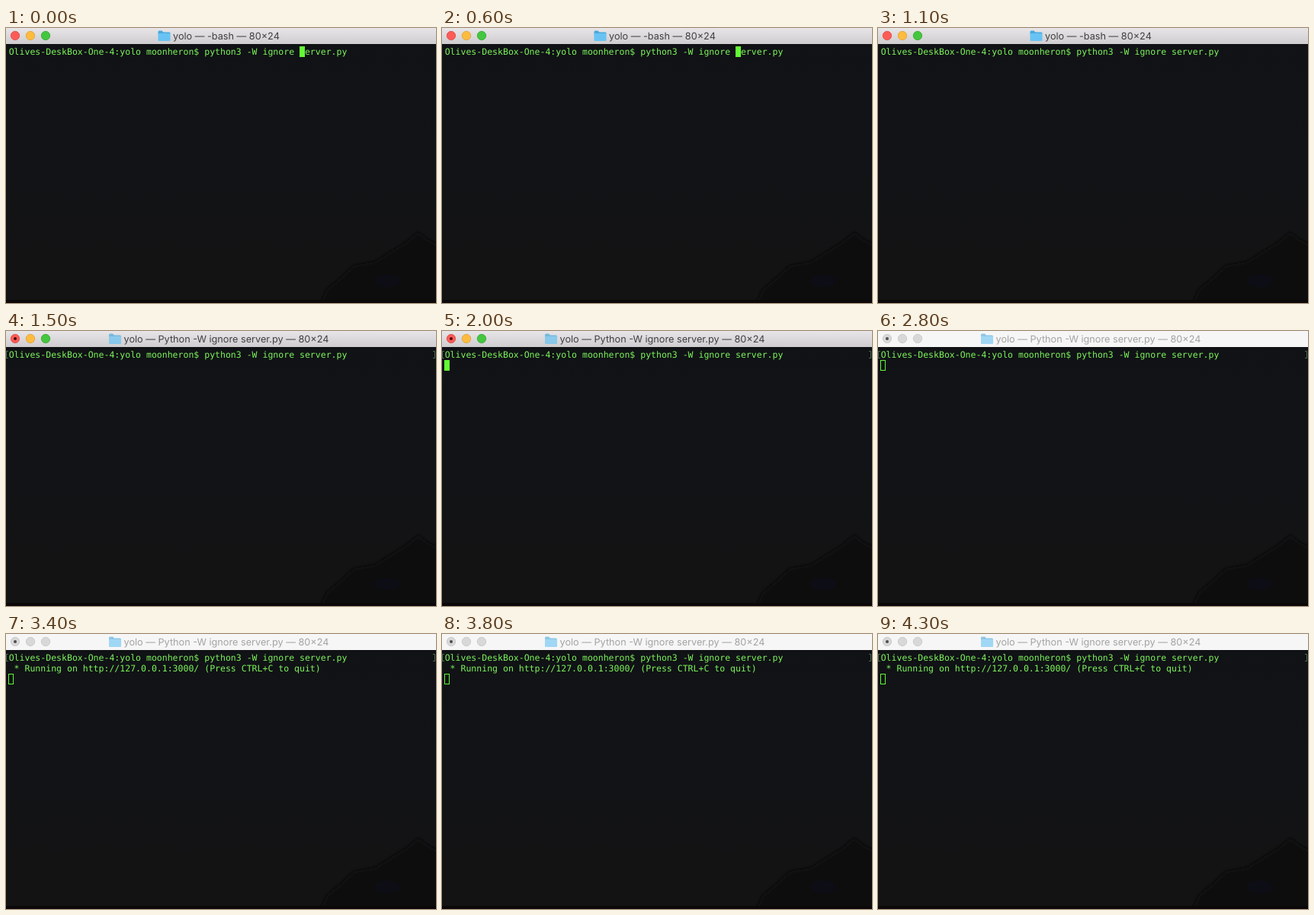
These frames come from a looping animation (564 px wide and 360 px high, 5 s). An HTML page:

```html
<!DOCTYPE html>
<html lang="en">
<head>
<meta charset="utf-8">
<style>
  html, body { margin: 0; width: 100%; height: 100%; overflow: hidden; background: #111316; }
  svg { display: block; width: 564px; height: 360px; }
  text { white-space: pre; text-rendering: geometricPrecision; }
  .term { font: 11.53px "DejaVu Sans Mono", monospace; fill: #7df45c; }
  #title { font: 12.7px Inter, sans-serif; fill: #403f41; }
  #lights circle { stroke-width: .8; }
  .blur #title { fill: #a3a3a3; }
  .blur #lights circle { fill: #d8d8d8; stroke: #c6c6c6; }
  .blur #bar { fill: #f6f6f6; }
  .blur #edited { fill: #4c4c4c; }
</style>
</head>
<body>
<svg id="stage" viewBox="0 0 564 360">
  <defs>
    <linearGradient id="sky" x2="0" y2="1">
      <stop stop-color="#101215"/>
      <stop offset=".5" stop-color="#111316"/>
      <stop offset=".8" stop-color="#131314"/>
      <stop offset="1" stop-color="#141313"/>
    </linearGradient>
    <linearGradient id="chrome" x2="0" y2="1">
      <stop stop-color="#e7e5e7"/>
      <stop offset="1" stop-color="#cfcdcf"/>
    </linearGradient>
    <filter id="soft"><feGaussianBlur stdDeviation="2"/></filter>
  </defs>

  <rect width="564" height="360" fill="url(#sky)"/>
  <g filter="url(#soft)">
    <path d="M412 362L420 343 440 326 456 311 484 306 506 292 524 281 541 267 552 276 570 285V362Z" fill="#09090b"/>
    <ellipse cx="500" cy="331" rx="17" ry="9" fill="#111113"/>
  </g>
  <rect y="356" width="564" height="4" fill="#0c0809"/>

  <rect id="bar" width="564" height="21" fill="url(#chrome)"/>
  <rect y="21" width="564" height="1" fill="#0b0c0d"/>
  <g id="lights">
    <circle cx="12" cy="10" r="5.7" fill="#fc5b57" stroke="#df4744"/>
    <circle cx="32" cy="10" r="5.7" fill="#fdbc40" stroke="#de9f34"/>
    <circle cx="52" cy="10" r="5.7" fill="#45c63f" stroke="#2fa82d"/>
  </g>
  <circle id="edited" cx="12" cy="10" r="2" fill="#4e0807"/>
  <g id="folder">
    <path d="M0 5V1.5Q0 0 1.5 0H5L7 2H14.5Q16 2 16 3.5V5Z" fill="#4aa9dd"/>
    <rect y="3.5" width="16" height="10" rx="1" fill="#68c3f3"/>
  </g>
  <text id="title" y="15"></text>

  <text class="term" x="3.7" y="35">Olives-DeskBox-One-4:yolo moonheron$ python3 -W ignore server.py</text>
  <g id="marks" fill="none" stroke="#4c6b4c">
    <path d="M3 26.5H.5V35.5H3M560 26.5H562.5V35.5H560"/>
  </g>
  <text id="output" class="term" x="3.7" y="48.6"> * Running on http://127.0.0.1:3000/ (Press CTRL+C to quit)</text>
  <rect id="cursor" stroke="#63f83a"/>
</svg>

<script>
const LOOP = 5000, BLINK = 800;
const ENTER = 1500, UNFOCUS = 2800, READY = 3300;
const el = id => document.getElementById(id);
const show = (id, on) => el(id).style.display = on ? "" : "none";

function setAttributes(id, values) {
  for (const name in values) el(id).setAttribute(name, values[name]);
}

function draw(time) {
  const running = time >= ENTER;
  const focused = time < UNFOCUS;
  const ready = time >= READY;

  el("stage").classList.toggle("blur", !focused);
  el("title").textContent = running ? "yolo — Python -W ignore server.py — 80×24" : "yolo — -bash — 80×24";
  setAttributes("title", { x: running ? 154.5 : 219 });
  setAttributes("folder", {
    transform: `translate(${running ? 135 : 199.5} 3.5)`,
    opacity: focused ? (running ? .7 : 1) : .6
  });
  show("edited", running);
  show("marks", running);
  show("output", ready);

  // A window without focus keeps a steady hollow cursor.
  const inset = focused ? 0 : .5;
  const x = running ? 3 : 385;
  const y = ready ? 52 : running ? 38 : 24;
  setAttributes("cursor", {
    x: x + inset, y: y + inset,
    width: 7 - 2 * inset, height: 14 - 2 * inset,
    fill: focused ? "#63fb34" : "none",
    "stroke-width": focused ? 0 : 1
  });
  show("cursor", !focused || Math.floor(time / BLINK) % 2 === 0);
}

function tick() {
  draw(performance.now() % LOOP);
  requestAnimationFrame(tick);
}
tick();
</script>
</body>
</html>
```
